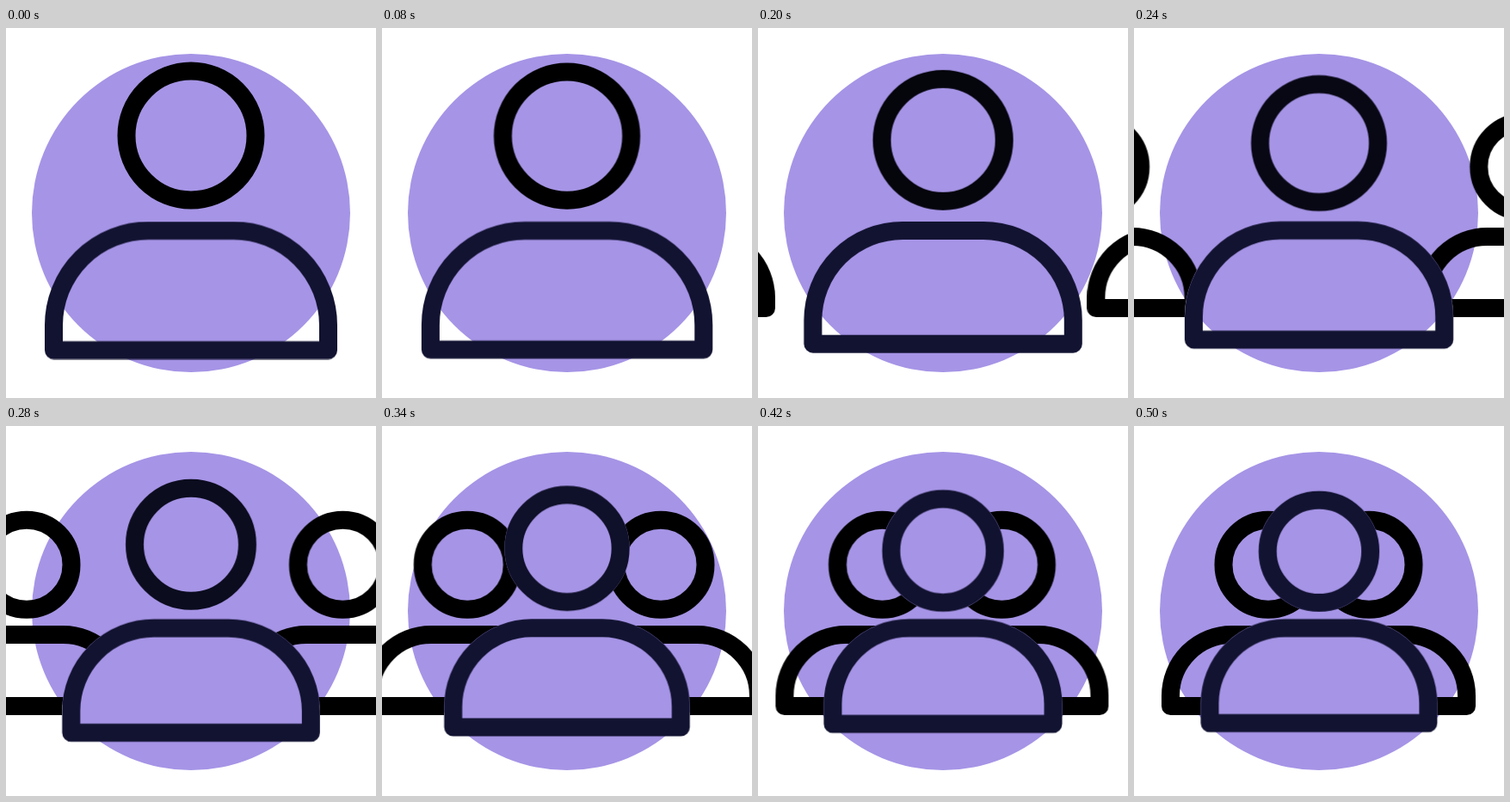
These frames come from a looping animation (430x430 px, 2 s). An HTML page without scripts:

```html
<!DOCTYPE html>
<html lang="en">
<head>
<meta charset="utf-8">
<title>Group of people</title>
<style>
  html, body { margin: 0; width: 100%; height: 100%; overflow: hidden; background: #fff; }
  svg { display: block; width: 100%; height: 100%; }

  .line { fill: none; stroke: #000; stroke-width: 21; stroke-linejoin: round; }
  .cut { fill: #000; }
  .navy { stroke: #121331; }
  .head, .body { vector-effect: non-scaling-stroke; }

  .head, .body, .left, .right {
    animation: 2s cubic-bezier(.6, 0, .4, 1) infinite;
  }
  .head { animation-name: head; }
  .body { animation-name: body; }
  .left { animation-name: left; }
  .right { animation-name: right; }

  @keyframes head {
    0%, .3% { transform: translate(215px, 125px) scale(1); stroke: #000; }
    25.3%, 100% { transform: translate(215px, 145.6px) scale(.796); stroke: #121331; }
  }
  @keyframes body {
    0%, .3% { transform: translate(215px, 235.5px) scale(1); }
    25.3%, 100% { transform: translate(215px, 234.7px) scale(.796); }
  }
  @keyframes left {
    0%, .3% { transform: translateX(-193px); }
    25.3%, 100% { transform: translateX(156px); }
  }
  @keyframes right {
    0%, .3% { transform: translateX(586px); }
    25.3%, 100% { transform: translateX(273px); }
  }
</style>
</head>
<body>
<svg viewBox="0 0 430 430">
  <defs>
    <g id="side">
      <circle cy="161.2" r="52"/>
      <path d="M-113.5 325.5V313.5a71 71 0 0 1 71-71H42.5a71 71 0 0 1 71 71V325.5Z"/>
    </g>
    <!-- hides the side people behind the front one -->
    <mask id="behind" maskUnits="userSpaceOnUse" x="0" y="0" width="430" height="430">
      <rect width="430" height="430" fill="#fff"/>
      <g class="line cut">
        <circle class="head" r="75"/>
        <path class="body" d="M-159.5 139V110a110 110 0 0 1 110-110H49.5a110 110 0 0 1 110 110V139Z"/>
      </g>
    </mask>
  </defs>

  <circle cx="215" cy="215" r="185" fill="#a694e6"/>

  <g class="line" mask="url(#behind)">
    <g class="left"><use href="#side"/></g>
    <g class="right"><use href="#side"/></g>
  </g>

  <g class="line navy">
    <circle class="head" r="75"/>
    <path class="body" d="M-159.5 139V110a110 110 0 0 1 110-110H49.5a110 110 0 0 1 110 110V139Z"/>
  </g>
</svg>
</body>
</html>
```
